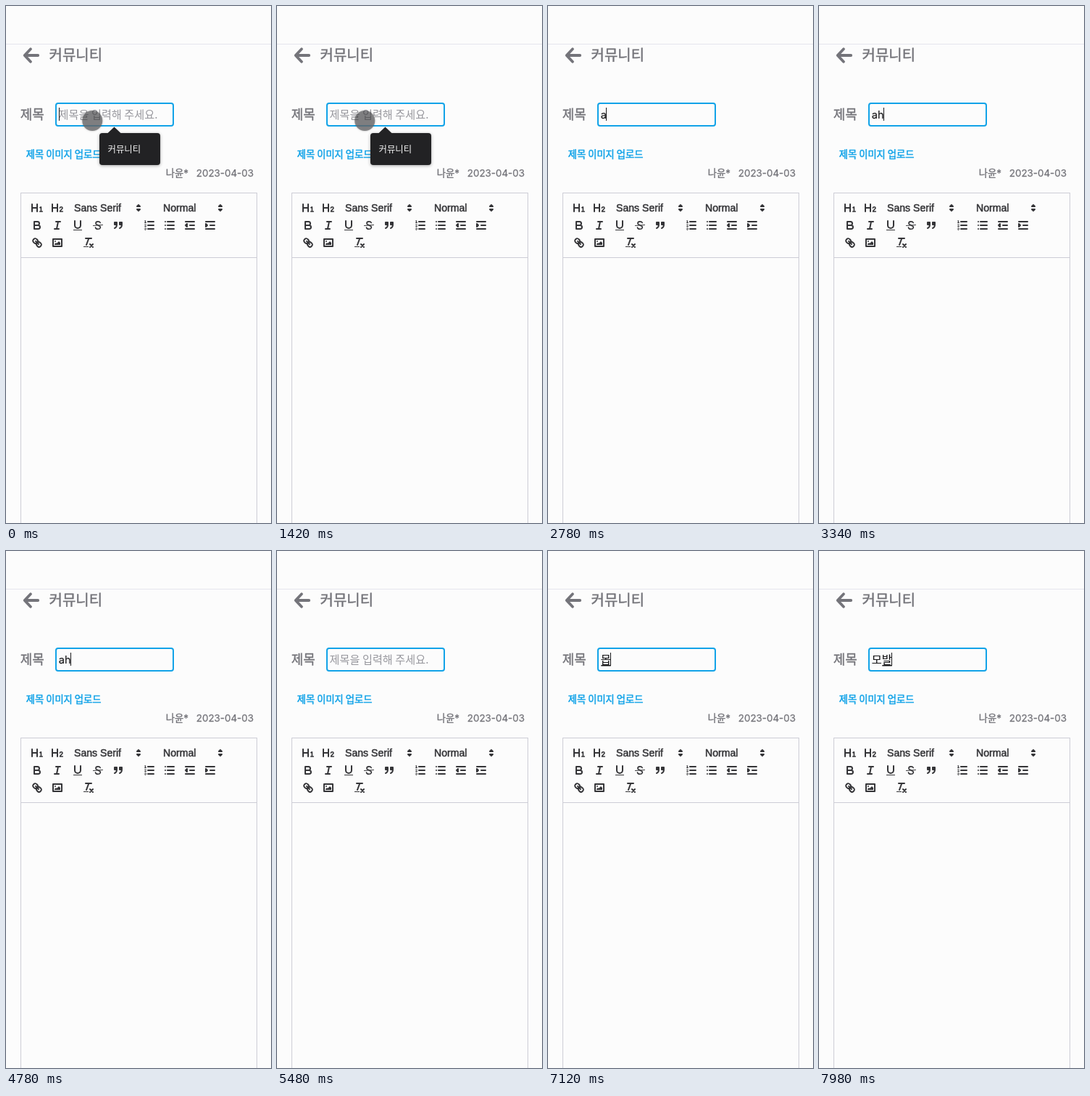
These frames come from a looping animation (366 by 712 pixels, 8000 ms). An HTML page with a canvas:

```html
<!DOCTYPE html>
<html lang="ko">
<head>
<meta charset="utf-8">
<title>글쓰기</title>
<style>
html, body { margin: 0; width: 100%; height: 100%; overflow: hidden; background: #fcfcfc; }
canvas { display: block; width: 366px; height: 712px; }
</style>
</head>
<body>
<canvas id="stage"></canvas>
<script>
const W = 366, H = 712, LOOP = 8000;
const PAPER = '#fcfcfc', GRAY = '#74747a', INK = '#353538', BLUE = '#12a3e8', RULE = '#cdcdd6';
const TYPED = '#18181a', DARK = '#222224', HINT = '#98989e';
const KO = '"Noto Sans CJK KR", "Noto Sans CJK", sans-serif';
const LATIN = 'Inter, "Noto Sans CJK KR", sans-serif';
const HELV = '"Liberation Sans", Arial, sans-serif';

const canvas = document.getElementById('stage');
const ctx = canvas.getContext('2d');
const dpr = window.devicePixelRatio || 1;
canvas.width = W * dpr;
canvas.height = H * dpr;

// Toolbar icons on an 18px grid: s = strokes, m = medium, t = thin, f = fills
const HEAD = 'M10,4V14a1,1,0,0,1-2,0V10H3v4a1,1,0,0,1-2,0V4A1,1,0,0,1,3,4V8H8V4a1,1,0,0,1,2,0Z';
const ICONS = {
  h1: { f: HEAD, m: 'M12.9 8.7L14.4 7.8V14M12.7 14H16.3' },
  h2: { f: HEAD, m: 'M12.4 9.2C12.6 7.3 16 7.3 16 9.3C16 10.8 12.8 12.2 12.5 14H16.3' },
  bold: { s: 'M5,4H9.5A2.5,2.5,0,0,1,9.5,9H5ZM5,9H10.5A2.5,2.5,0,0,1,10.5,14H5Z' },
  italic: { s: 'M7 4H13M5 14H11M8 14L10 4' },
  underline: { s: 'M5,3V9a4,4,0,0,0,8,0V3', f: 'M3 15H15V16H3Z' },
  strike: { m: 'M12.2 5.6C11.4 3.2 6 3.2 6 6.2C6 7.6 7.2 8.2 9 8.7M10 9.6C14 11 12.4 14.2 9 14.2C7 14.2 5.8 13.4 5.5 12', t: 'M15.5 8.5L2.5 9.5' },
  quote: { s: 'M4 5H7V8H4ZM11 5H14V8H11ZM7,8c0,4-3,5-3,5M14,8c0,4-3,5-3,5', f: 'M4 5H7V8H4ZM11 5H14V8H11Z' },
  ordered: { s: 'M7 4H15M7 9H15M7 14H15', t: 'M2.6 3L3.5 2.5V5.5M2.5 5.5H4.5M4.5 10.5H2.5C2.5 10.2 4.4 9.4 4.4 8.3A1 1 0 0 0 2.5 8.2M2.5 14.8A1 1 0 0 0 4.4 14.7A.7 .7 0 0 0 3.7 14A.7 .7 0 0 0 4.4 13.2A1 1 0 0 0 2.5 13' },
  bullet: { s: 'M6 4H15M6 9H15M6 14H15M3 4H3.01M3 9H3.01M3 14H3.01' },
  outdent: { s: 'M3 14H15M3 4H15M9 9H15M5 7V11L3 9Z', f: 'M5 7V11L3 9Z' },
  indent: { s: 'M3 14H15M3 4H15M9 9H15M3 7V11L5 9Z', f: 'M3 7V11L5 9Z' },
  link: { s: 'M7 7L11 11M8.9,4.577a3.476,3.476,0,0,1,.36,4.679A3.476,3.476,0,0,1,4.577,8.9C3.185,7.5,2.035,6.4,4.217,4.217S7.5,3.185,8.9,4.577ZM13.423,9.1a3.476,3.476,0,0,0-4.679-.36,3.476,3.476,0,0,0,.36,4.679c1.392,1.392,2.5,2.542,4.679.36S14.815,10.5,13.423,9.1Z' },
  image: { s: 'M3 4H15V14H3Z', f: 'M5 7A1 1 0 0 1 7 7A1 1 0 0 1 5 7ZM5 12V11L7 9L8 10L11 7L13 9V12Z' },
  clean: { s: 'M5 3H13M6 12L9.35 3M11 11L15 15M15 11L11 15', f: 'M2 14H9V15H2Z' },
  picker: { s: 'M7 11L9 13L11 11ZM7 7L9 5L11 7Z', f: 'M7 11L9 13L11 11ZM7 7L9 5L11 7Z' }
};

// [name, centre x, centre y]
const TOOLBAR = [
  ['h1', 43, 278], ['h2', 71, 278], ['picker', 183, 278], ['picker', 296, 278],
  ['bold', 43, 302], ['italic', 71, 302], ['underline', 99, 302], ['strike', 127, 302],
  ['quote', 155, 302], ['ordered', 198, 302], ['bullet', 226, 302], ['outdent', 254, 302],
  ['indent', 282, 302], ['link', 43, 326], ['image', 71, 326], ['clean', 114, 326]
];

// [start time, field text, number of composing characters at the end]
const TYPING = [
  [0, '', 0], [2700, 'a', 0], [2960, 'ah', 0], [3660, 'ahq', 0], [3960, 'ahqk', 0],
  [4520, 'ahq', 0], [4720, 'ah', 0], [4940, 'a', 0], [5140, '', 0],
  [5900, 'ㅁ', 1], [6160, '모', 1], [6880, '몹', 1], [7160, '모바', 1], [7480, '모발', 1]
];
const POINTER_END = 2700;

// "extra" thickens the letters to reach weights between regular and bold
function text(str, x, y, font, color, { align = 'left', extra = 0 } = {}) {
  ctx.font = font;
  ctx.fillStyle = ctx.strokeStyle = color;
  ctx.textAlign = align;
  ctx.fillText(str, x, y);
  if (extra) {
    ctx.lineWidth = extra;
    ctx.strokeText(str, x, y);
  }
}

function rect(x, y, w, h, color) {
  ctx.fillStyle = color;
  ctx.fillRect(x, y, w, h);
}

function line(path, width, color) {
  ctx.lineWidth = width;
  ctx.strokeStyle = color;
  ctx.stroke(new Path2D(path));
}

function icon(name, cx, cy) {
  const { s, m, t, f } = ICONS[name];
  ctx.save();
  ctx.translate(cx - 9, cy - 9);
  ctx.fillStyle = INK;
  if (f) ctx.fill(new Path2D(f));
  if (s) line(s, 2, INK);
  if (m) line(m, 1.6, INK);
  if (t) line(t, 1, INK);
  ctx.restore();
}

function placeholder(color) {
  text('제목을 입력해 주세요.', 72.6, 154.6, '15.2px ' + KO, color);
}

function page() {
  rect(0, 0, W, H, PAPER);
  rect(0, 52, W, 1, '#e5e5ee');

  ctx.lineCap = ctx.lineJoin = 'round';
  line('M44.2 68H26M34 59.3L25.7 68L34 76.7', 3.8, GRAY);
  text('커뮤니티', 59.5, 74.6, '20px ' + KO, GRAY, { extra: 0.45 });
  text('제목', 19.7, 155.6, '18px ' + KO, GRAY, { extra: 0.35 });
  text('제목 이미지 업로드', 27.7, 208.7, '13.3px ' + KO, BLUE, { extra: 0.5 });
  text('나윤*', 252, 235, '13.4px ' + LATIN, GRAY, { align: 'right', extra: 0.35 });
  text('2023-04-03', 342, 235, '13.4px ' + LATIN, GRAY, { align: 'right', extra: 0.25 });

  ctx.beginPath();
  ctx.roundRect(69, 134, 162, 31, 3);
  ctx.lineWidth = 2;
  ctx.strokeStyle = BLUE;
  ctx.stroke();

  rect(20, 257, 327, 1, RULE);
  rect(20, 346, 327, 1, RULE);
  rect(20, 257, 1, H, RULE);
  rect(346, 257, 1, H, RULE);
  text('Sans Serif', 94, 283, '14.1px ' + HELV, INK, { extra: 0.5 });
  text('Normal', 217, 283, '14.1px ' + HELV, INK, { extra: 0.5 });
  for (const item of TOOLBAR) icon(...item);
}

function field(time) {
  const [start, value, composing] = TYPING.filter(step => step[0] <= time).pop();
  const left = 72.8;
  let end = left;
  if (value) {
    const font = /^[a-z]/.test(value) ? '14.6px ' + LATIN : '15.2px ' + KO;
    text(value, left, 154.8, font, TYPED, { extra: 0.15 });
    end += ctx.measureText(value).width;
    if (composing) {
      const from = left + ctx.measureText(value.slice(0, -composing)).width;
      rect(from + 0.5, 157, end - from - 0.5, 1.5, TYPED);
    }
  } else {
    placeholder(HINT);
  }
  const caretOn = value || (start === 0 ? time < 1000 : time < 5400);
  if (caretOn) rect(value ? Math.floor(end - 0.3) : 73, 140, 1, 18, TYPED);
}

function tooltip() {
  ctx.save();
  ctx.shadowColor = 'rgba(0,0,0,.35)';
  ctx.shadowBlur = 4 * dpr;
  ctx.shadowOffsetY = dpr;
  ctx.fillStyle = DARK;
  ctx.beginPath();
  ctx.roundRect(129, 175, 84, 44, 4);
  ctx.fill();
  ctx.restore();
  ctx.fillStyle = DARK;
  ctx.fill(new Path2D('M139.5 176L149.5 166.5L159.5 176Z'));
  text('커뮤니티', 140.5, 201.6, '12.4px ' + KO, '#f4f4f4');
}

function pointer(time) {
  const p = Math.min(1, Math.max(0, (time - 840) / 540));
  const x = 119.3 + 2 * p * p * (3 - 2 * p);
  ctx.save();
  ctx.shadowColor = 'rgba(0,0,0,.3)';
  ctx.shadowBlur = 3 * dpr;
  ctx.fillStyle = 'rgba(108,108,110,.78)';
  ctx.beginPath();
  ctx.arc(x, 158, 14, 0, Math.PI * 2);
  ctx.fill();
  ctx.clip();
  ctx.shadowColor = 'transparent';
  ctx.globalAlpha = 0.55;
  placeholder('#505054');
  ctx.restore();
}

const origin = performance.now();

function draw() {
  const time = (performance.now() - origin) % LOOP;
  ctx.setTransform(dpr, 0, 0, dpr, 0, 0);
  page();
  field(time);
  if (time < POINTER_END) {
    tooltip();
    pointer(time);
  }
  requestAnimationFrame(draw);
}
draw();
</script>
</body>
</html>
```
